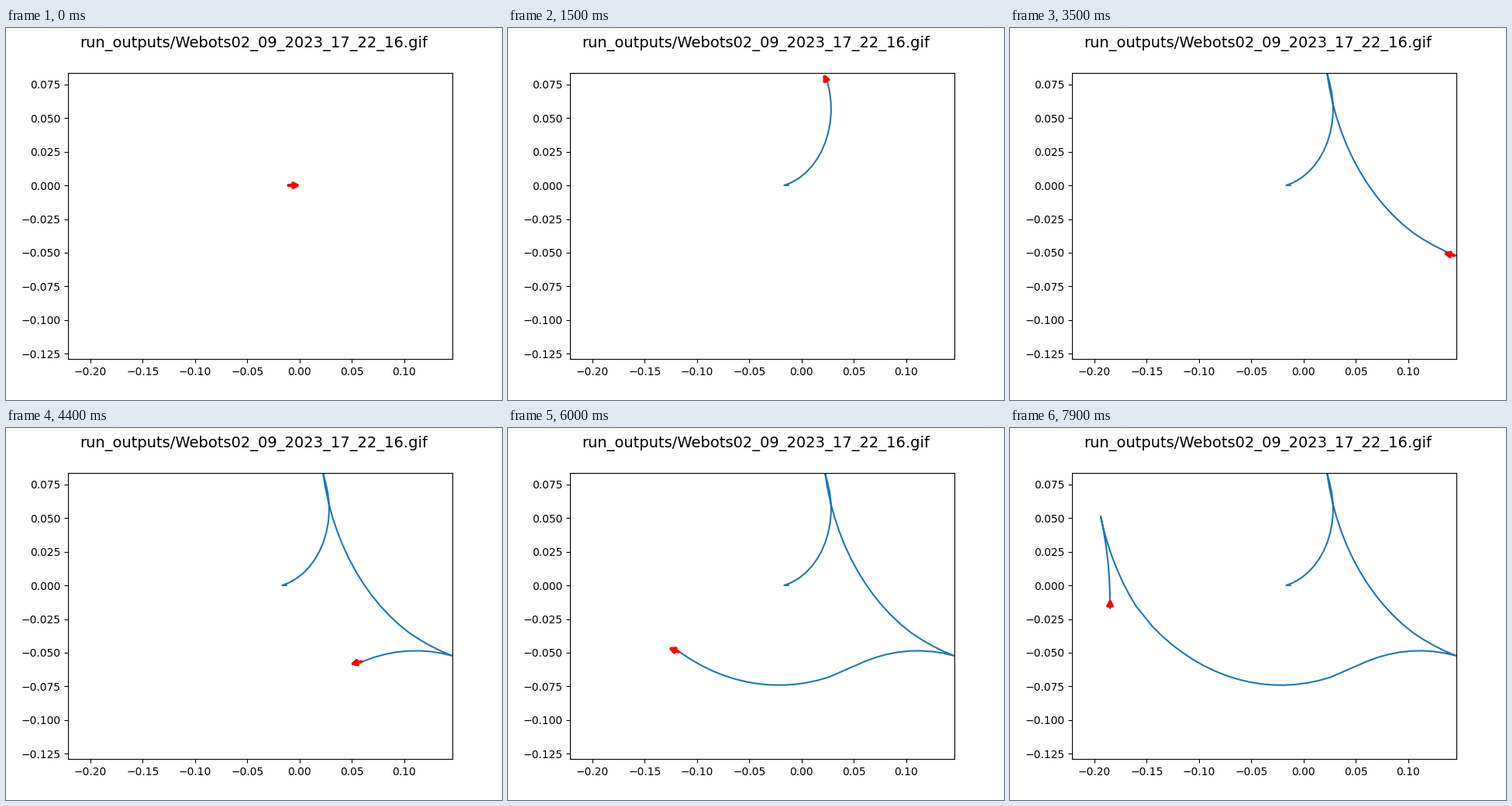
Animation, 640 px wide and 480 px high, one loop 8000 ms. Source, as a matplotlib script:

```python
import numpy as np
import matplotlib.pyplot as plt
from matplotlib.animation import FuncAnimation

FRAMES, STEP_MS = 80, 100
XLIM = (-0.2213, 0.1461)
YLIM = (-0.1289, 0.08363)
REACH = 0.043                  # arrow length as a share of each axis range

# The car drives circular arcs at steady speed; x + iy is a position.
# Each leg: gear (+1 ahead, -1 reverse), steps, turn in degrees, end point
START = -0.0126 + 0j
LEGS = [
    (-1, 1, 0, -0.0166 + 0j),
    (1, 13, 96, 0.0250 + 0.0759j),
    (1, 2, 0, 0.0224 + 0.0836j),
    (-1, 13, 50, 0.1046 - 0.0351j),
    (-1, 4, 12, 0.1461 - 0.0523j),
    (1, 8, 30, 0.0609 - 0.0563j),
    (1, 3, 0, 0.0261 - 0.0681j),
    (1, 16, -53, -0.1439 - 0.0310j),
    (1, 2, 0, -0.1602 - 0.0153j),
    (1, 7, -24, -0.1939 + 0.0512j),
    (-1, 6, -17, -0.1850 - 0.0170j),
]


def arc(p, q, turn, u):
    """Point and unit direction at share u of the arc from p to q."""
    bend = np.radians(turn)
    share = np.expm1(1j * bend * u) / np.expm1(1j * bend) if turn else u
    chord = q - p
    return p + chord * share, chord / abs(chord) * np.exp(1j * bend * (u - 0.5))


def drive():
    """Yield position and heading for every step."""
    here, heading, last_gear = START, 1 + 0j, LEGS[0][0]
    yield here, heading
    for gear, steps, turn, end in LEGS:
        if gear != last_gear:          # one idle step to change gear
            yield here, heading
        for k in range(1, steps + 1):
            point, way = arc(here, end, turn, k / steps)
            heading = gear * way
            yield point, heading
        here, last_gear = end, gear


pos, heading = np.array(list(drive())).T
tip = pos + REACH * (heading.real * np.ptp(XLIM)
                     + 1j * heading.imag * np.ptp(YLIM))

plt.rcParams["font.family"] = "DejaVu Sans"
fig, ax = plt.subplots(figsize=(6.4, 4.8), dpi=100)
fig.suptitle("run_outputs/Webots02_09_2023_17_22_16.gif", fontsize=14)
ax.set(xlim=XLIM, ylim=YLIM)
trail, = ax.plot([], [], color="C0", lw=1.5)
arrow = ax.annotate("", xy=(0, 0), xytext=(0, 0), annotation_clip=False,
                    arrowprops=dict(arrowstyle="-|>", color="red", lw=3))


def draw(i):
    trail.set_data(pos.real[:i + 1], pos.imag[:i + 1])
    arrow.xy = (tip[i].real, tip[i].imag)
    arrow.set_position((pos[i].real, pos[i].imag))
    return trail, arrow


anim = FuncAnimation(fig, draw, frames=FRAMES, interval=STEP_MS,
                     repeat=True, repeat_delay=0, blit=False)
plt.show()
```
